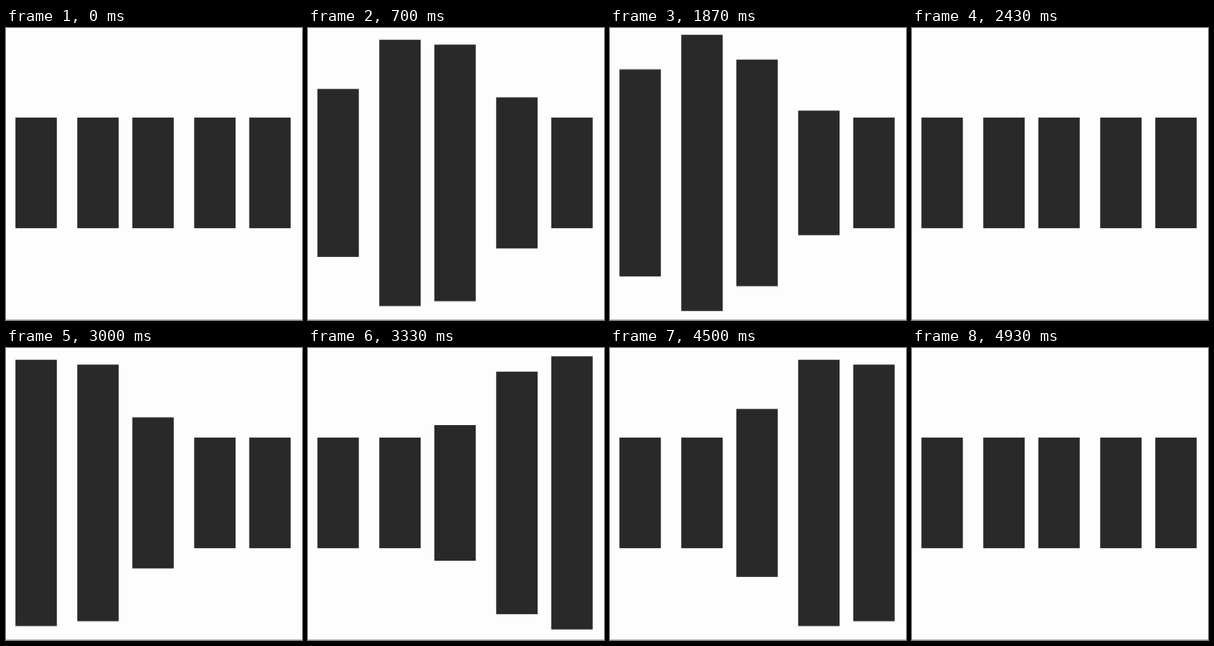
Write an HTML page that moves like this. It is 400 px wide and 394 px high and loops after 5010 ms.

```html
<!DOCTYPE html>
<html lang="en">
<head>
<meta charset="utf-8">
<title>Wave loader</title>
<style>
  html, body {
    margin: 0;
    width: 100%;
    height: 100%;
    overflow: hidden;
    background: #fdfdfd;
  }
  svg {
    display: block;
  }
  .bar {
    fill: #292929;
    transform-box: fill-box;
    transform-origin: center;
  }
  .rule {
    fill: #bdbdbd;
  }
</style>
</head>
<body>
<svg width="400" height="394" viewBox="0 0 400 394">
  <rect class="rule" y="393" width="400" height="1"/>
</svg>
<script>
  const LOOP = 5010;      // ms
  const CYCLE = 1200;     // one wave
  const START = 318;      // first bar begins to stretch
  const STAGGER = 100;    // delay from bar to bar
  const FPS = 30;
  const LEFTS = [12.7, 96.3, 170.7, 254.3, 328.7];
  const WIDTH = 56;
  const HEIGHT = 149.3;
  const MIDDLE = 195.5;

  const stretch = [
    { offset: 0, transform: 'scaleY(1)' },
    { offset: 0.2, transform: 'scaleY(2.5)' },
    { offset: 0.4, transform: 'scaleY(1)' },
    { offset: 1, transform: 'scaleY(1)' }
  ].map(step => ({ ...step, easing: 'ease-in-out' }));

  const stage = document.querySelector('svg');

  function addBar(left) {
    const bar = document.createElementNS('http://www.w3.org/2000/svg', 'rect');
    const box = { class: 'bar', x: left, y: MIDDLE - HEIGHT / 2, width: WIDTH, height: HEIGHT };
    for (const name in box) bar.setAttribute(name, box[name]);
    stage.append(bar);
    const wave = bar.animate(stretch, { duration: CYCLE, iterations: Infinity });
    wave.pause();
    return wave;
  }

  const waves = LEFTS.map(addBar);

  // The motion runs at 30 steps a second, shown on a 10 ms clock.
  function stepTime(ms) {
    const tick = Math.floor(ms / 10) * 10 + 5;
    return Math.floor(tick * FPS / 1000) * 1000 / FPS;
  }

  function draw(ms) {
    const time = stepTime(ms % LOOP);
    waves.forEach((wave, i) => {
      wave.currentTime = time - START - i * STAGGER;
    });
  }

  const begin = performance.now();
  function tick() {
    draw(performance.now() - begin);
    requestAnimationFrame(tick);
  }
  tick();
</script>
</body>
</html>
```
